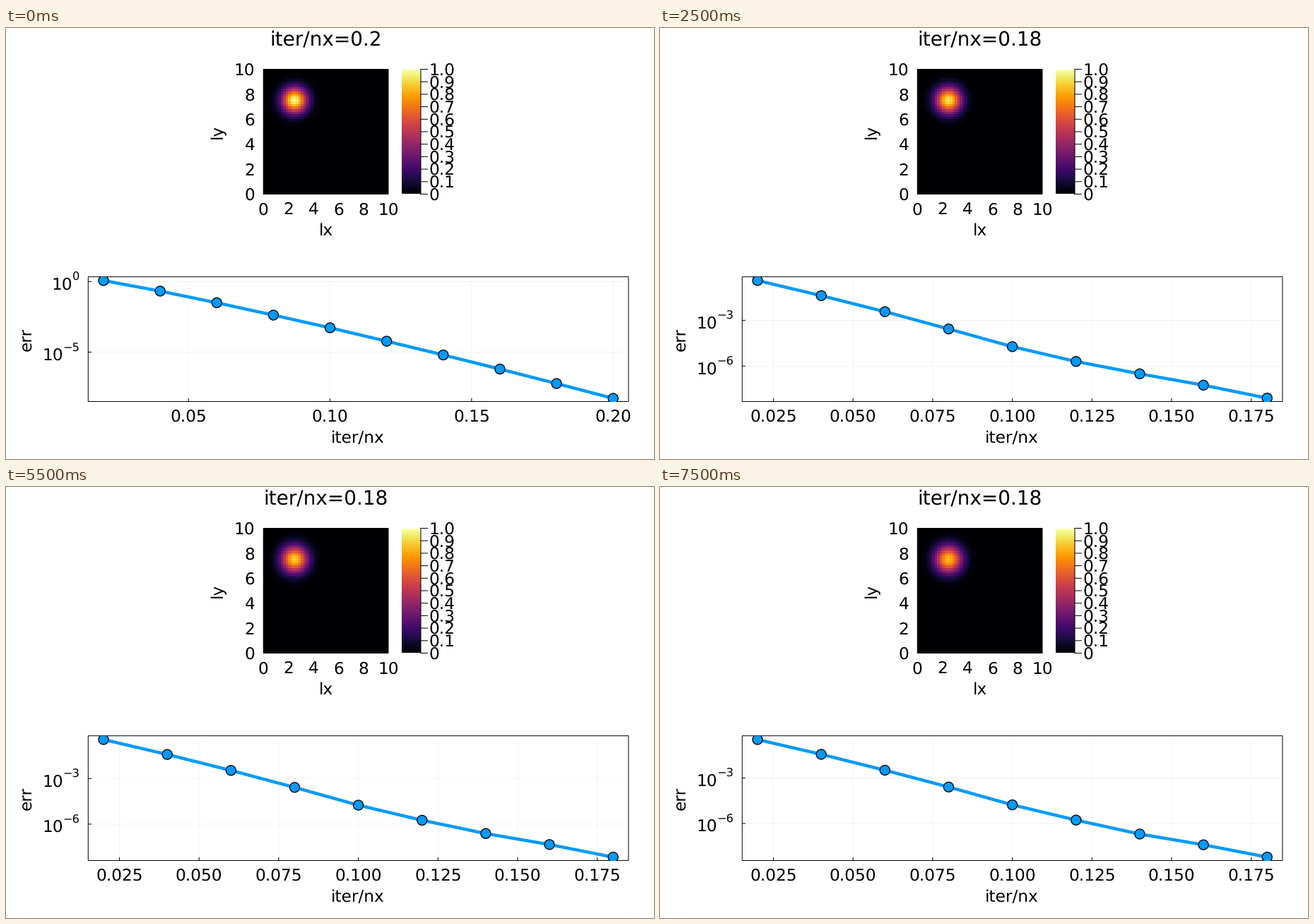
Write a matplotlib script that moves like this. It is 917x611 px and loops after 8 s.

```python
import matplotlib.pyplot as plt
import numpy as np
from matplotlib.animation import FuncAnimation
from matplotlib.patches import Circle, Rectangle

W, H, DPI = 917, 611, 64
FRAMES, INTERVAL = 16, 500
TEXT, TITLE = 23.3, 27.9          # font heights in pixels
BLUE = "#009AFA"

# heatmap, colorbar and error plot boxes: left, right, bottom, top
HEAT = (364, 541, 236, 58)
BAR = (560, 587, 235, 59)
ERR = (116.3, 880.9, 529.5, 352.7)
UNIT = 17.7                       # heatmap pixels per axis unit

# log-error curve heights in pixels
FIRST = np.array([358, 373, 389.5, 407, 425, 444, 463.5, 483.5, 504, 525])
EARLY = np.array([358, 379.6, 402.4, 427.2, 452.2, 473, 489.5, 506, 524.7])
LATE = np.array([358, 379, 401.5, 425.3, 450.6, 472.2, 492, 507.2, 524.7])

plt.rcParams.update({"font.family": "DejaVu Sans", "text.hinting": "none",
                     "path.snap": False})


def px(n):
    return n * 72 / DPI


fig = plt.figure(figsize=(W / DPI, H / DPI), dpi=DPI, facecolor="white")
ax = fig.add_axes([0, 0, 1, 1])
ax.axis("off")


def label(x, y, s, ha="center", size=TEXT, rot=0):
    return ax.text(x, y, s, ha=ha, va="baseline", fontsize=px(size),
                   rotation=rot, rotation_mode="anchor", color="black")


def line(xs, ys, width=1.0, color="black", **kw):
    return ax.plot(xs, ys, lw=px(width), color=color, **kw)[0]


def frame_box(left, right, bottom, top):
    ax.add_patch(Rectangle((left, top), right - left, bottom - top,
                           fill=False, lw=px(1), ec="black", zorder=2))


# Concentration field on a 50 x 50 grid
cells = np.linspace(0.1, 9.9, 50)
R2 = (cells[None, :] - 2.5) ** 2 + (cells[::-1, None] - 7.5) ** 2


def field(i):
    spread = 1 + 0.011 * (i + 1)
    return np.exp(-R2 / spread) / spread


style = dict(cmap="inferno", vmin=0, vmax=1, aspect="auto",
             interpolation="nearest")
heat = ax.imshow(field(0), extent=HEAT, **style)
ax.imshow(np.linspace(1, 0, 256)[:, None], extent=BAR, **style)
ax.set_xlim(0, W)
ax.set_ylim(H, 0)
ax.set_autoscale_on(False)

# Fixed parts
frame_box(364.3, 541, 235.5, 58.8)
for v in range(0, 11, 2):
    label(364.3 + UNIT * v, 264.5, str(v))
    label(352.4, 235.5 - UNIT * v + 8.5, str(v), ha="right")
label(452.5, 294, "lx")
label(306, 147, "ly", rot=90)

line([587, 587], [235.5, 58.5])
for k in range(11):
    y = 235.5 - UNIT * k
    line([587, 596.5], [y, y])
    label(598, y + 8, f"{k / 10:.1f}" if k else "0", ha="left")

label(497.7, 588, "iter/nx")
label(36, 441, "err", rot=90)
frame_box(*ERR)
clip = Rectangle((ERR[0], ERR[3]), ERR[1] - ERR[0], ERR[2] - ERR[3],
                 transform=ax.transData)

title = label(452.2, 24, "", size=TITLE)
curve = line([], [], 4.5, BLUE, zorder=4, solid_joinstyle="round")
curve.set_clip_path(clip)

moving = []


def dot(x, y):
    c = ax.add_patch(Circle((x, y), 7, fc=BLUE, ec="black", lw=px(1.3),
                            zorder=5))
    c.set_clip_path(clip)
    moving.append(c)


def x_tick(x, text):
    moving.append(line([x, x], [ERR[3], ERR[2]], 0.8, alpha=0.06, zorder=1))
    moving.append(line([x, x], [ERR[2] - 4, ERR[2]]))
    moving.append(label(x, 558, text))


def y_tick(y, power):
    moving.append(line([ERR[0], ERR[1]], [y, y], 0.8, alpha=0.06, zorder=1))
    moving.append(line([ERR[0], ERR[0] + 4], [y, y]))
    small = 0.7 * TEXT
    exponent = str(power).replace("-", "\u2212")
    width = small * (0.636 + (0.838 if power < 0 else 0))
    moving.append(label(104.7, y - 1.5, exponent, ha="right", size=small))
    moving.append(label(104.7 - width, y + 11, "10", ha="right"))


def update(i):
    while moving:
        moving.pop().remove()
    heat.set_data(field(i))

    if i == 0:
        ys, step, digits = FIRST, 0.05, 2
        powers = {0: 359.5, -5: 459.5}
    else:
        t = (i - 1) / (FRAMES - 2)
        ys, step, digits = EARLY + (LATE - EARLY) * t, 0.025, 3
        powers = {-3: 415.2 - 2.7 * t, -6: 480.2 - 3.2 * t}

    xs = 0.02 * np.arange(1, len(ys) + 1)
    scale = 721.2 / (xs[-1] - xs[0])

    def to_px(x):
        return 138 + (x - xs[0]) * scale

    curve.set_data(to_px(xs), ys)
    for x, y in zip(to_px(xs), ys):
        dot(x, y)
    title.set_text(f"iter/nx={xs[-1]:.2g}")
    for k in range(1, int(xs[-1] / step + 1e-6) + 1):
        x_tick(to_px(k * step), f"{k * step:.{digits}f}")
    for power, y in powers.items():
        y_tick(y, power)
    return []


anim = FuncAnimation(fig, update, frames=FRAMES, interval=INTERVAL,
                     init_func=lambda: update(0), repeat=True,
                     repeat_delay=0, blit=False)
plt.show()
```
